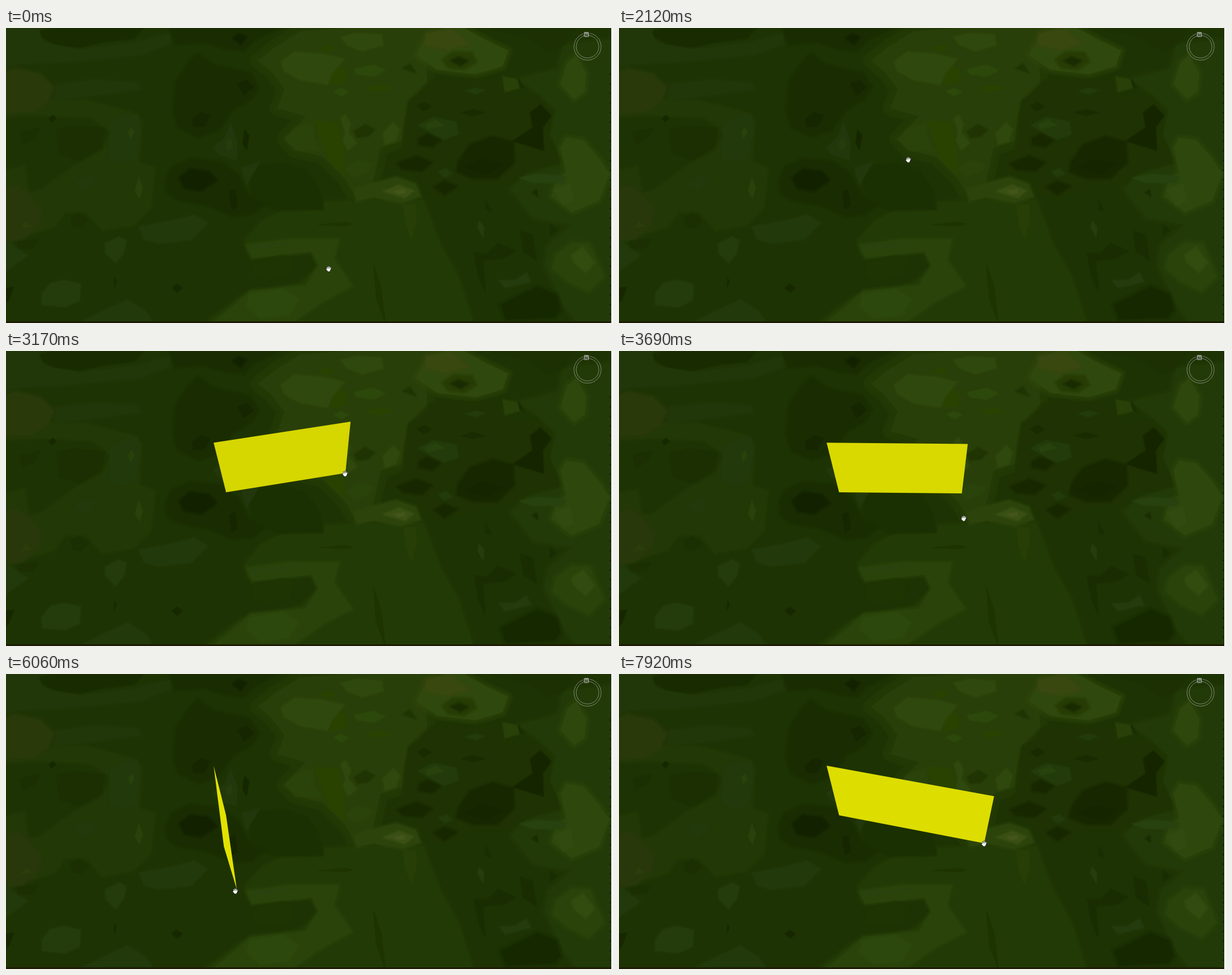
Animation of 1073x522 px, one loop 8 s. Source, as an HTML page with a canvas:

```html
<!DOCTYPE html>
<html lang="en">
<head>
<meta charset="utf-8">
<title>Drawing a wall on terrain</title>
<style>
html, body { margin: 0; width: 100%; height: 100%; overflow: hidden; background: #fff; }
canvas { display: block; }
</style>
</head>
<body>
<canvas id="stage" width="1073" height="522"></canvas>
<script>
const W = 1073, H = 522, LOOP = 8000;
const ctx = document.getElementById('stage').getContext('2d');
const ground = document.createElement('canvas');
ground.width = W;
ground.height = H;
const g = ground.getContext('2d');

// Flat patches with stepped, contour-like edges.
function patch(color, spread, ...shapes) {
  g.fillStyle = g.strokeStyle = color;
  g.lineJoin = 'round';
  for (const shape of shapes) {
    const path = new Path2D('M' + shape + 'Z');
    g.globalAlpha = 0.3;
    for (const k of [1, 0.5]) {
      if (!spread) break;
      g.lineWidth = spread * k;
      g.stroke(path);
    }
    g.globalAlpha = 1;
    g.fill(path);
  }
}

function paintWest() {
  patch('#21370a', 10,
    '0,0 60,0 65,25 130,38 230,26 290,10 290,27 240,47 105,60 20,64 0,70',
    '90,100 160,92 233,97 238,108 150,120 85,128');
  patch('#223806', 8,
    '0,130 85,128 140,128 225,150 240,165 235,238 263,248 256,318 225,348 170,358 142,325 105,325 85,352 20,372 0,375');
  patch('#1e3303', 8,
    '0,160 70,158 150,162 182,185 168,215 120,240 60,284 43,288 36,240 0,248');
  patch('#1b2f02', 4,
    '90,180 120,173 174,178 168,210 130,234 95,222',
    '25,185 60,177 50,195 30,206',
    '115,335 130,328 146,340 132,354 118,350',
    '20,377 56,374 46,390 22,390');
  patch('#2a390a', 10, '0,78 15,72 60,82 84,106 74,130 45,148 0,150');
  patch('#28380a', 8, '0,285 20,280 40,295 62,322 58,348 30,372 0,378');
  patch('#192b00', 5, '60,6 85,0 243,0 226,18 175,24 130,34 85,28 64,16');
  patch('#22390b', 6,
    '184,170 205,158 233,152 238,180 228,230 206,238 182,230',
    '235,352 290,342 333,331 356,345 328,374 270,381 245,374',
    '130,522 170,502 215,481 245,500 262,522',
    '120,272 145,260 158,270 140,290',
    '0,375 22,392 38,402 0,430');
  patch('#243b0b', 6,
    '175,382 200,369 213,376 208,398 194,416 176,398',
    '64,470 78,452 102,446 132,453 130,482 105,494 64,490');
  patch('#29420c', 3,
    '222,176 227,185 220,196 216,184',
    '235,264 242,283 236,302 228,288');
  patch('#2a3d0a', 2, '35,341 48,352 25,355');
  patch('#172801', 2,
    '76,160 83,154 89,160 81,166',
    '293,460 302,453 312,460 303,468',
    '192,442 195,449 191,458',
    '0,460 14,458 5,482 0,487');
}

function paintMiddle() {
  patch('#293f09', 28,
    '475,34 520,6 600,0 760,0 742,50 746,112 712,125 704,165 700,200 662,212 655,245 648,275 618,300 600,268 560,228 510,216 492,196 530,156 480,142 492,108 470,78 445,58');
  patch('#223b06', 10,
    '562,308 620,306 738,304 768,384 800,440 826,522 352,522 415,474 520,452 556,420 548,386 428,400 422,376 452,342 490,322 560,322');
  patch('#2a430a', 9,
    '425,384 500,374 588,374 580,410 612,456 560,484 505,522 365,522 405,490 432,465 530,456 552,420 540,396 435,407');
  patch('#1f3403', 8, '436,416 490,404 511,411 500,440 460,446 437,439');
  patch('#29420e', 3, '430,386 470,381 515,380 480,388 430,393');
  patch('#2d480c', 8, '430,472 490,462 518,480 500,508 450,514 425,492');
  patch('#1b3002', 8, '432,246 490,240 530,252 552,284 560,320 480,322 435,302');
  patch('#1a2c01', 10,
    '340,46 365,66 430,80 445,104 434,124 400,144 375,180 340,192 305,175 297,145 302,95 325,60',
    '290,0 480,0 440,20 420,40 390,36 350,24 300,28',
    '284,270 294,247 326,232 380,238 408,260 430,300 456,312 435,329 400,332 360,314 302,303 286,290');
  patch('#122200', 8,
    '307,265 325,250 358,254 372,269 345,288 316,283',
    '402,18 412,11 424,16 415,28');
  patch('#152600', 4,
    '411,99 425,93 436,105 420,117',
    '330,162 345,150 360,155 350,174 332,174',
    '396,290 404,287 408,314 400,319',
    '422,182 429,190 425,214 419,204');
  patch('#22370c', 4,
    '385,196 397,168 409,200 408,234 376,224 366,211',
    '416,247 449,237 425,278');
  patch('#263c0d', 2, '388,202 398,194 402,211 390,217');
  patch('#294200', 6,
    '545,165 586,168 597,214 598,258 572,236 560,205',
    '571,80 590,68 601,76 600,95 575,100',
    '640,106 665,101 680,107 650,112',
    '555,36 570,30 580,36 568,42');
  patch('#2e480d', 6,
    '486,60 510,42 560,46 598,55 577,80 568,100 520,92 492,76',
    '592,16 620,9 664,12 667,30 630,41 602,30',
    '592,160 600,153 609,170 605,185 620,204 605,216 596,200 600,185',
    '666,186 685,167 696,180 689,200 670,206');
  patch('#2c480a', 3,
    '615,73 650,65 671,75 650,86 620,82',
    '578,112 592,106 607,113 593,121');
  patch('#2a430b', 6,
    '493,196 512,177 543,168 545,198 558,218 512,216',
    '600,250 620,234 649,241 640,254 615,263');
  patch('#2c440b', 8, '615,285 640,277 690,264 724,276 733,298 700,309 650,300 620,306');
  patch('#3a4f13', 6, '668,289 695,278 720,288 705,300');
  patch('#43551a', 3, '685,288 704,285 705,292 692,294');
  patch('#1f3402', 6,
    '616,183 635,171 651,180 640,191 621,193',
    '702,71 714,64 724,79');
  patch('#273f06', 2, '702,312 725,312 726,340 717,374 706,345');
  patch('#1d3300', 3,
    '553,348 600,344 613,347 600,350',
    '650,420 663,460 670,520 655,480');
}

function paintEast() {
  patch('#223a07', 12,
    '905,90 975,72 985,30 1073,20 1073,522 1010,522 985,490 952,420 957,385 1000,348 932,336 892,285 920,258 985,240 962,190 972,145 940,115');
  patch('#2f480d', 16, '725,48 745,10 775,0 810,0 850,22 888,40 878,68 830,82 762,74');
  patch('#38480e', 10, '742,10 788,2 818,28 780,38 742,30');
  patch('#263c04', 8, '772,56 790,43 823,44 831,60 810,73 782,70');
  patch('#192b00', 8, '787,58 800,52 816,58 804,66');
  patch('#1c3004', 10, '862,0 1003,0 985,28 960,38 925,14');
  patch('#1e3203', 10,
    '750,94 890,92 902,108 862,130 938,122 962,146 957,190 980,236 930,248 892,272 830,276 772,300 746,290 722,258 674,242 702,215 712,132');
  patch('#294009', 5, '878,86 903,91 908,106 882,113');
  patch('#233b0a', 6,
    '728,172 755,158 796,166 800,188 772,198',
    '812,111 830,106 847,110 830,117',
    '765,254 778,248 789,258 775,264');
  patch('#28420d', 3, '741,171 760,163 774,172 746,179');
  patch('#172800', 8,
    '730,196 745,188 768,198 754,210 730,206',
    '692,240 725,227 753,238 735,253 702,250',
    '800,236 820,207 860,192 896,202 898,238 868,266 826,266 797,254',
    '757,281 775,271 797,280 775,295');
  patch('#142500', 4,
    '812,246 842,232 878,241 850,258',
    '897,200 932,176 927,150 945,136 963,155 948,176 950,216');
  patch('#192b01', 3,
    '805,150 825,144 847,150 825,155',
    '728,138 740,132 751,139 738,146');
  patch('#2d470d', 14,
    '992,62 1008,48 1026,80 1023,113 1004,126 980,100',
    '990,194 1020,198 1048,230 1067,258 1048,306 1000,326 964,298 972,270 990,255 980,212');
  patch('#28420f', 5, '908,265 940,259 990,263 985,274 930,273');
  patch('#314a10', 6, '968,286 998,274 1004,306 985,314');
  patch('#2a430b', 14, '972,402 1000,380 1032,382 1045,412 1057,440 1030,466 992,448 966,425');
  patch('#324c10', 6, '1000,402 1020,388 1040,415 1025,432 1004,415');
  patch('#1a2d02', 4,
    '828,398 850,400 870,381 900,395 880,407 842,411 847,465 836,440',
    '910,360 930,366 937,410 915,396',
    '848,305 857,324 848,321',
    '963,348 973,358 962,366',
    '930,291 938,286 940,298',
    '906,90 915,106 909,104');
  patch('#162800', 12, '875,490 940,458 973,472 980,499 970,512 884,516');
  patch('#243b0e', 6, '872,447 900,446 920,433 928,449 882,460');
  patch('#253d0d', 2, '836,341 845,351 844,371 833,353');
}

function paintFrame() {
  g.fillStyle = '#142004';
  for (let y = 80; y < H; y += 17) g.fillRect(1067, y, 2, 3);
  g.fillStyle = '#1c1c04';
  g.fillRect(0, 519, 1070, 3);
  g.fillStyle = '#fff';
  g.fillRect(1070, 0, 3, H);
}

function paintCompass() {
  g.strokeStyle = '#7f8a74';
  g.lineWidth = 1;
  for (const [r, gap] of [[24, 0.26], [20, 0]]) {
    g.beginPath();
    g.arc(1028, 33, r, -Math.PI / 2 - 0.08 + gap, Math.PI * 1.5 - 0.08 - gap);
    g.stroke();
  }
  g.fillStyle = '#8d9785';
  g.beginPath();
  g.roundRect(1021.5, 7, 9, 9, 2);
  g.fill();
  g.fillStyle = '#25331a';
  g.font = 'bold 8px "Liberation Sans", Arial, sans-serif';
  g.textAlign = 'center';
  g.fillText('N', 1026, 14.5);
}

g.fillStyle = '#1e3303';
g.fillRect(0, 0, W, H);
paintWest();
paintMiddle();
paintEast();
paintFrame();
paintCompass();

// time, pointer x, y, then the wall's far foot when a wall is showing
const steps = [
  [0, 570, 426], [270, 488, 350], [520, 407, 274], [800, 390, 254],
  [1330, 408, 247], [1600, 460, 241], [1850, 510, 233], [2120, 511, 233],
  [2370, 511, 233, 511, 231], [2640, 545, 228], [2890, 599, 217],
  [3170, 599, 217, 600, 216], [3420, 603, 252, 600, 216],
  [3690, 609, 296, 606, 252], [3960, 612, 304, 612, 301],
  [4210, 606, 321], [4460, 572, 372], [4740, 544, 380],
  [5020, 537, 382], [5270, 530, 384], [5540, 470, 385],
  [5810, 425, 385], [6060, 405, 384, 408, 381],
  [6310, 412, 384, 408, 381], [6560, 440, 383, 420, 382],
  [6840, 521, 372, 520, 370], [7120, 546, 366, 545, 364],
  [7400, 558, 360, 557, 356], [7670, 603, 331, 602, 329],
  [7920, 645, 300, 645.5, 299.5]
];
const foot = [389, 250];

// Perspective: the wall leans away from the centre and shrinks down the screen.
function topOf([x, y]) {
  const lean = 0.142 + (y - 216) * 0.00022;
  return [x + (x - 536) * lean, y - 91 + (y - 216) * 0.094];
}

function drawWall(end) {
  const turn = Math.atan2(end[1] - foot[1], end[0] - foot[0]) * 180 / Math.PI;
  const tone = Math.round(Math.min(226, 217 + turn * 0.36));
  ctx.fillStyle = `rgb(${tone},${tone},0)`;
  ctx.beginPath();
  for (const p of [foot, end, topOf(end), topOf(foot)]) ctx.lineTo(...p);
  ctx.fill();
}

const palm = new Path2D('M-2.5,0L3,-.5L2.5,2.5L1.5,4.5L-1.5,4.5L-3,2Z');
const fingers = new Path2D('M-2.3,1L-2.8,-2.6M-.6,0L-.7,-4M1.2,0L1.4,-3.6M2.8,1L3.5,-2M-2,2.5L-4,.8');
const fist = new Path2D('M-4,-1L-2,-3L3,-3L4,-1L3,3L-2,3Z');

function drawHand(x, y, closed) {
  ctx.save();
  ctx.translate(x + 0.5, y);
  ctx.lineCap = ctx.lineJoin = 'round';
  for (const [color, extra] of [['#10180a', 1], ['#fff', 0]]) {
    ctx.strokeStyle = ctx.fillStyle = color;
    ctx.lineWidth = 1.2 + extra;
    if (closed) {
      ctx.lineWidth = 0.4 + extra;
      ctx.stroke(fist);
      ctx.fill(fist);
    } else {
      ctx.stroke(fingers);
      ctx.lineWidth = 0.4 + extra;
      ctx.stroke(palm);
      ctx.fill(palm);
    }
  }
  ctx.restore();
}

function draw(now) {
  const t = now % LOOP;
  const [start, x, y, ...end] = steps.findLast(s => s[0] <= t) || steps[0];
  ctx.drawImage(ground, 0, 0);
  if (end.length) drawWall(end);
  drawHand(x, y, start === 800);
}

const begin = performance.now();
function tick() {
  draw(performance.now() - begin);
  requestAnimationFrame(tick);
}
tick();
</script>
</body>
</html>
```
